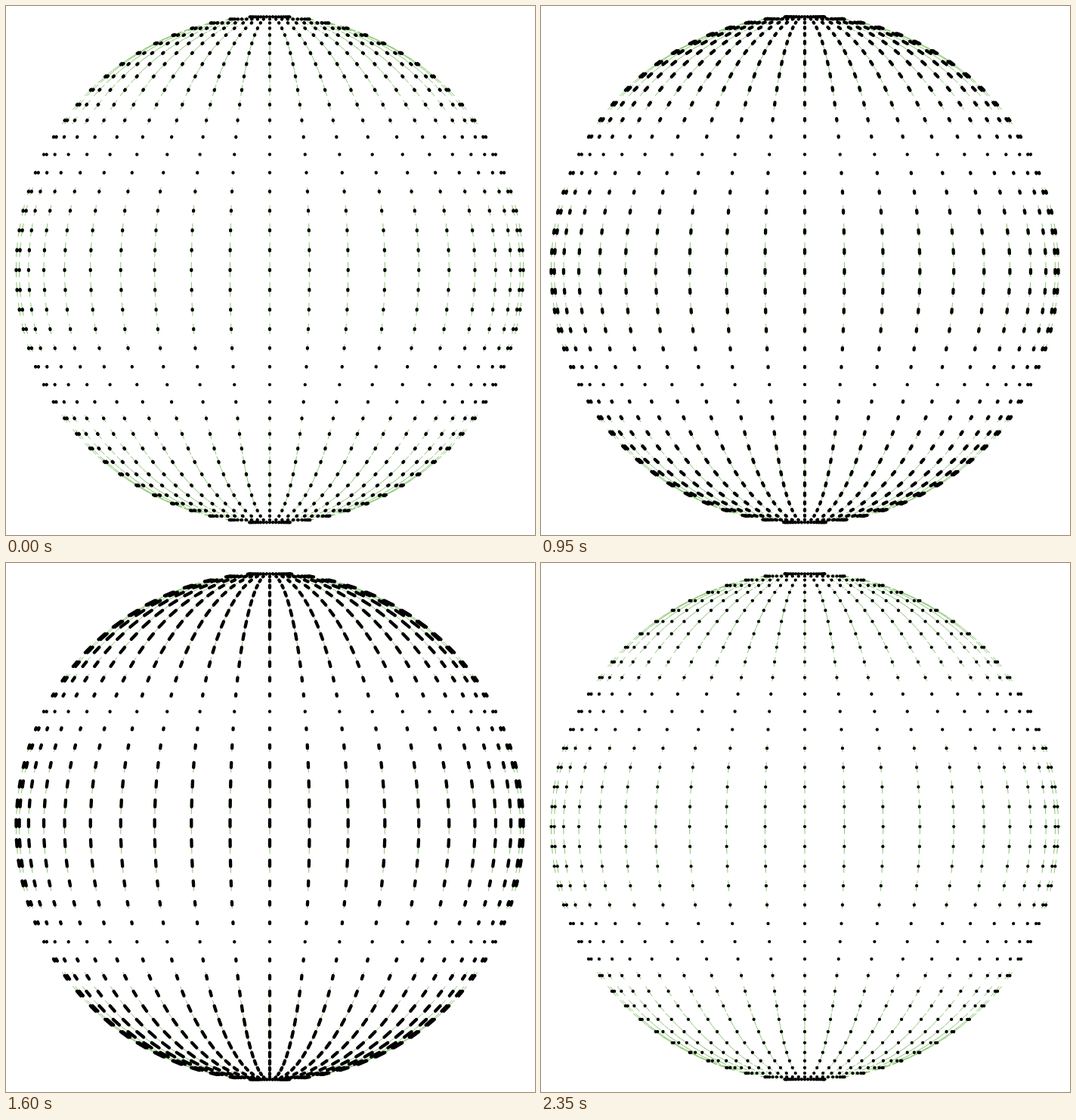
Write an HTML page with a canvas that moves like this. It is 700 px wide and 700 px high and loops after 2.4 s.

```html
<!DOCTYPE html>
<html lang="en">
<head>
<meta charset="utf-8">
<title>Oscillating sphere</title>
<style>
  html, body { margin: 0; height: 100%; overflow: hidden; background: #fff; }
  canvas { display: block; }
</style>
</head>
<body>
<canvas id="stage" width="700" height="700"></canvas>
<script>
const ctx = document.getElementById('stage').getContext('2d');
const CX = 349, CY = 348.8, RADIUS = 335.5, AMPLITUDE = 10;
const STEP = 50, STEPS = 48;

// Grid points with their tangential (meridional) degree-3 displacement
const points = [];
for (let row = 1; row < 40; row++) {
  const theta = row * Math.PI / 40;
  const sin = Math.sin(theta), cos = Math.cos(theta);
  const size = AMPLITUDE * sin * (1 - 5 * cos * cos);
  for (let col = -10; col <= 10; col++) {
    const side = Math.sin(col * Math.PI / 20);
    points.push({
      x: CX + RADIUS * sin * side,
      y: CY - RADIUS * cos,
      dx: size * cos * side,
      dy: size * sin
    });
  }
}

function strokeSegments(from, to, color, width) {
  ctx.beginPath();
  for (const { x, y, dx, dy } of points) {
    ctx.moveTo(x + from * dx, y + from * dy);
    // The small offset keeps zero-length segments visible as dots
    ctx.lineTo(x + to * dx, y + to * dy + 0.01);
  }
  ctx.strokeStyle = color;
  ctx.lineWidth = width;
  ctx.stroke();
}

function draw() {
  const step = Math.floor(performance.now() / STEP) % STEPS + 1;
  const swing = Math.sin(2 * Math.PI * step / STEPS);
  ctx.clearRect(0, 0, 700, 700);
  ctx.lineCap = 'butt';
  strokeSegments(-1, 1, '#6db84d', 0.8);
  ctx.lineCap = 'round';
  strokeSegments(0, swing, '#000', 4.3);
  requestAnimationFrame(draw);
}
draw();
</script>
</body>
</html>
```
